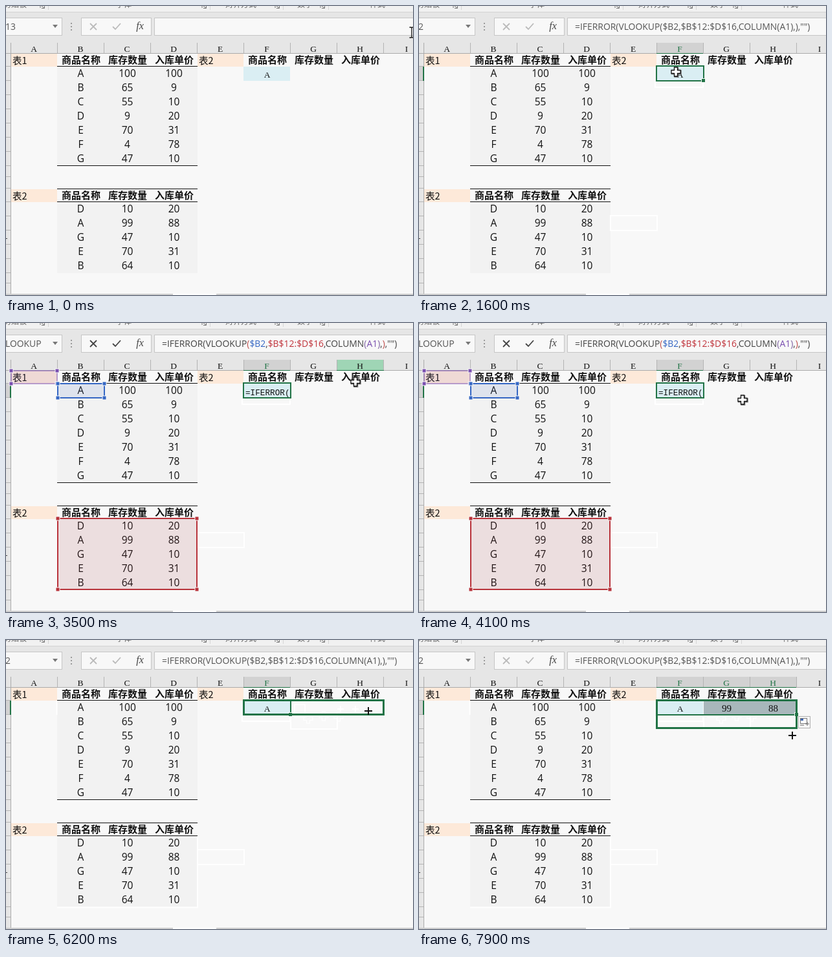
Recreate the animation shown at these times as an HTML page. Size 629 by 448 pixels, loop 8000 ms.

```html
<!DOCTYPE html>
<html lang="zh">
<head>
<meta charset="utf-8">
<title>Spreadsheet lookup</title>
<style>
html, body { margin: 0; width: 629px; height: 448px; overflow: hidden; background: #f8f8f8; }
svg { display: block; }
text { white-space: pre; fill: #111; }
.ui { font: 13.9px "Open Sans", "Noto Sans", sans-serif; fill: #555; }
.num { font: 15.5px "Open Sans", "Noto Sans", sans-serif; text-anchor: middle; }
.head { font: bold 15px "Noto Sans CJK SC", "Noto Sans CJK", sans-serif; text-anchor: middle; }
.cjk { font: 14.5px "Noto Sans CJK SC", "Noto Sans CJK", sans-serif; }
.small { font: 12px "Noto Sans CJK SC", "Noto Sans CJK", sans-serif; fill: #666; }
.col { font: 13.5px "Liberation Serif", serif; text-anchor: middle; }
.val { font: 15px "Liberation Serif", serif; text-anchor: middle; }
.fx { font: italic 16px "Liberation Serif", serif; text-anchor: middle; fill: #444; }
.mono { font: 12.7px "Liberation Mono", monospace; }
</style>
</head>
<body>
<svg id="stage" width="629" height="448" viewBox="0 0 629 448"></svg>
<script>
const LOOP = 8000, GREEN = '#217346', LINE = '#b4b4b4';
const stage = document.getElementById('stage');
const colX = i => 7 + 72 * i;
const rowY = [0, 73, 94, 116, 138, 160, 182, 204, 226, 248, 265, 283, 304, 326, 348, 370, 392, 414, 430, 447];

function add(parent, tag, attrs, content) {
  const el = document.createElementNS('http://www.w3.org/2000/svg', tag);
  for (const k in attrs) el.setAttribute(k, attrs[k]);
  if (content !== undefined) el.textContent = content;
  parent.appendChild(el);
  return el;
}
const group = (parent = stage) => add(parent, 'g', {});
const box = (p, x, y, width, height, fill) => add(p, 'rect', { x, y, width, height, fill });
const path = (p, d, stroke, width = 1, fill = 'none') =>
  add(p, 'path', { d, stroke, 'stroke-width': width, fill });
const text = (p, cls, x, y, s) => add(p, 'text', { class: cls, x, y }, s);
const frame = (p, x, y, width, height, stroke, w = 2, fill = 'none') =>
  add(p, 'rect', { x, y, width, height, stroke, 'stroke-width': w, fill });
const show = (el, on) => el.setAttribute('visibility', on ? 'visible' : 'hidden');

// Ribbon and formula bar
function drawBars() {
  box(stage, 0, 0, 629, 9, '#f1f1f1');
  box(stage, 0, 9, 629, 64, '#e6e6e6');
  path(stage, 'M0 9.5H629', '#d2d2d2');
  [[-4, '剪贴板'], [170, '字体'], [339, '对齐方式'], [450, '数字'], [562, '样式']]
    .forEach(([x, s]) => text(stage, 'small', x, 2, s));
  [57, 307, 420, 490].forEach(x => {
    path(stage, `M${x - 4} 0V3M${x - 2} 0L${x + 2} 3M${x + 2.5} 0V3.5H${x - 2}`, '#777');
    path(stage, `M${x + 8.5} 0V6`, '#d5d5d5');
  });
  [[-2, 88], [116, 108], [229, 410]].forEach(([x, w]) =>
    frame(stage, x + .5, 18.5, w, 27, '#c6c6c6', 1, '#f8f8f8'));
  path(stage, 'M72 29H80L76 34Z', 'none', 0, '#777');
  [27, 32, 37].forEach(y => box(stage, 100, y - 1, 2, 2, '#999'));
  text(stage, 'fx', 207, 36, 'fx');
}

// Column and row headings, tables
function drawSheet() {
  box(stage, 0, 74, 7, 374, '#e6e6e6');
  'ABCDEFGHI'.split('').forEach((c, i) => {
    path(stage, `M${colX(i) + .5} 57V73`, LINE);
    text(stage, 'col', colX(i) + 36, 70.5, c);
  });
  rowY.slice(2).forEach(y => path(stage, `M0 ${y - .5}H7`, LINE));
  path(stage, 'M0 73.5H629M7.5 57V448', '#ababab');
  path(stage, 'M0 360.5H2', '#444');

  [[0, 74, '表1'], [4, 74, '表2'], [0, 284, '表2']].forEach(([c, y, s]) => {
    box(stage, colX(c) + 1, y, 71, 20, '#fde9d9');
    text(stage, 'cjk', colX(c) + 3, y + 16, s);
  });
  table(1, 'A 100 100,B 65 9,C 55 10,D 9 20,E 70 31,F 4 78,G 47 10');
  table(11, 'D 10 20,A 99 88,G 47 10,E 70 31,B 64 10');
  path(stage, 'M79 93.5H296M79 247.5H296M79 283.5H296M79 303.5H296', '#111');
  heads(5, 73);
  box(stage, 367, 94, 72, 22, '#daeef3');
  path(stage, 'M0 447H258M325 447H629', '#cfcfcf', 2);
  box(stage, 258, 446, 67, 2, '#fff');
}
function heads(col, y) {
  ['商品名称', '库存数量', '入库单价'].forEach((s, i) =>
    text(stage, 'head', colX(col + i) + 37, y + 16, s));
}
function table(row, data) {
  const rows = data.split(','), top = rowY[row + 1];
  box(stage, 79, top, 217, rows.length * 22, '#f2f2f2');
  heads(1, rowY[row]);
  rows.forEach((r, j) => r.split(' ').forEach((v, i) =>
    text(stage, 'num', colX(i + 1) + 36.5, top + 16 + 22 * j, v)));
}

// A highlighted heading pair for the current selection
function heading(c0, c1, row) {
  const g = group();
  for (let c = c0; c <= c1; c++) {
    box(g, colX(c) + 1, 57, 71, 16, '#d2d2d2');
    text(g, 'col', colX(c) + 36, 70.5, 'ABCDEFGHI'[c]).style.fill = GREEN;
  }
  path(g, `M${colX(c0)} 73.5H${colX(c1 + 1)}`, GREEN);
  box(g, 0, rowY[row], 7, rowY[row + 1] - rowY[row] - 1, '#d2d2d2');
  path(g, `M7 ${rowY[row]}V${rowY[row + 1]}`, GREEN, 2);
  return g;
}
function rangeMark(g, x, y, w, h, color, line = 2) {
  frame(g, x, y, w, h, color, line, color).setAttribute('fill-opacity', .1);
  [[x, y], [x + w, y], [x, y + h], [x + w, y + h]].forEach(([a, b]) =>
    frame(g, a - 3, b - 3, 6, 6, '#f8f8f8', 1, color));
}
const plusShape = 'M-2.5-7H2.5V-2.5H7V2.5H2.5V7H-2.5V2.5H-7V-2.5H-2.5Z';

drawBars();
drawSheet();

const nameText = text(stage, 'ui', -1, 36.5, '');
const buttons = path(stage, 'M130 27L140 37M140 27L130 37M165 32L169 36L177 27', '#bbb', 1.8);

// Formula, plain or with coloured references
const formula = text(stage, 'ui', 241, 36.5);
const parts = [['=IFERROR('], ['VLOOKUP'], ['(', '#c0504d'], ['$B2', '#3567c4'], [','], ['$B$12:$D$16', '#c0343c'],
  [','], ['COLUMN'], ['(', '#8064a2'], ['A1', '#7a4fb0'], [')', '#8064a2'], [','], [')', '#c0504d'], [',"")']]
  .map(([s, c]) => ({ el: add(formula, 'tspan', {}, s), c: c || '#444' }));

const headE = heading(4, 4, 13), headF = heading(5, 5, 2), headG = heading(6, 6, 3), headFH = heading(5, 7, 2);
const hover = group();
box(hover, 511, 57, 73, 16, '#9fd5b5');
path(hover, 'M511.5 57V73M583.5 57V73', LINE);
path(hover, 'M511 73.5H584', GREEN);
text(hover, 'col', 547, 70.5, 'H');

// Faint white traces left after the selection has moved
const traceA = group(), traceB = group();
frame(traceA, 296, 325, 72, 23, '#fff', 2);
path(traceA, 'M365 118V126H439V118', '#fff', 2);
frame(traceB, 440, 117, 72, 21, '#fff', 2);
frame(traceB, 446, 100, 16, 20, '#fff', 1.5);
path(traceB, 'M79 414.5H296V304M78.5 94V116', '#fff', 2);
[[514, 119], [491, 118], [467, 122]].forEach(([x, y]) =>
  path(traceB, plusShape, '#fff', 1.2).setAttribute('transform', `translate(${x} ${y})`));
const traceC = group();
[517, 540].forEach(x => path(traceC, `M${x - 5} 107H${x + 5}M${x} 102V112`, '#fff', 2));

const filled = group();
box(filled, 440, 94, 143, 22, '#a8b7bb');
text(filled, 'val', 475.5, 111, '99');
text(filled, 'val', 547.5, 111, '88');
const cellA = text(stage, 'col', 403.5, 111, 'A');

const edit = group();
rangeMark(edit, 8, 74, 71, 20, '#7a4fb0', 1);
rangeMark(edit, 80, 94, 72, 22, '#3567c4');
rangeMark(edit, 80, 303, 215, 110, '#b8323a');
text(edit, 'mono', 370, 111.5, '=IFERROR(');

const selection = frame(stage, 0, 0, 0, 0, GREEN, 2);
const handle = frame(stage, 0, 0, 6, 6, '#f8f8f8', 1, GREEN);
const drag = frame(stage, 0, 0, 0, 0, GREEN, 3);

const options = group();
frame(options, 586.5, 118.5, 18, 18, '#b0b0b0', 1, '#f8f8f8');
frame(options, 589.5, 121.5, 10, 8, '#777', 1, '#fff');
box(options, 590, 122, 4, 3, '#3f68b5');
path(options, 'M589 132H595M597 130H603M600 127V133', '#666');

const tip = group();
frame(tip, 609.5, 47.5, 40, 18, '#bbb', 1, '#fff');
text(tip, 'small', 611, 61, '编辑栏');

const cursors = { beam: group(), cross: group(), plus: group(), down: group() };
path(cursors.beam, 'M-3.5-8H-1L0-7L1-8H3.5M0-7V7M-3.5 8H-1L0 7L1 8H3.5', '#111', 1.3);
path(cursors.cross, plusShape, '#777', 2).setAttribute('transform', 'translate(.8 .8)');
path(cursors.cross, plusShape, '#111', 1.3, '#fff');
path(cursors.plus, 'M-6 0H6M0-6V6', '#111', 2);
path(cursors.down, 'M-1-6H1V1H4L0 6L-4 1H-1Z', '#111', 1, '#111');

// Pointer stops: start time, kind, then one x,y for every 100 ms
const pointer = [
  [0, 'beam', '627,41'], [100, 'cross', '560,68 482,98 413,109'],
  [1000, 'cross', '408,99'], [1200, 'cross', '407,99'],
  [1400, 'cross', '406,100 402,101 397,102 398,101 408,95 446,80'],
  [2000, 'beam', '530,40 595,34 621,27 622,28 621,32'],
  [3100, 'beam', '617,35 601,44'], [3300, 'down', '575,64'],
  [3400, 'cross', '556,78 540,91 525,108 512,120'],
  [4000, 'cross', '508,120 500,119 491,118 489,118 484,118 479,118 476,118'],
  [4900, 'cross', '423,106 427,108 431,111 435,114'],
  [5300, 'plus', '439,116 440,116'], [5700, 'plus', '444,115 465,111 491,108 517,107 540,107 560,110'],
  [6400, 'cross', '562,110 565,110 568,111 571,112 575,113 579,114'],
  [7000, 'plus', '582,116 584,117'], [7800, 'plus', '582,135 577,148']
];
function pointerAt(t) {
  const [start, kind, list] = pointer.filter(p => p[0] <= t).pop();
  const spots = list.split(' ');
  const [x, y] = spots[Math.min(Math.floor((t - start) / 100), spots.length - 1)].split(',').map(Number);
  return { kind, x, y };
}

function place(el, x, y, w, h) {
  Object.entries({ x, y, width: w, height: h }).forEach(([k, v]) => el.setAttribute(k, v));
}
function select(x, y, w, h, knob) {
  place(selection, x, y, w, h);
  handle.setAttribute('x', x + w - 3.5);
  handle.setAttribute('y', y + h - 3.5);
  show(handle, knob);
}

function draw(now) {
  const t = Math.floor(now % LOOP / 100) * 100;
  const within = (a, b) => t >= a && t < b;
  const editing = within(2700, 4200), onG = within(4200, 4900), done = t >= 6400;
  const p = pointerAt(t);

  nameText.textContent = t < 1400 ? '13' : editing ? 'LOOKUP' : onG ? '3' : '2';
  buttons.setAttribute('stroke', editing ? '#444' : '#bbb');
  show(formula, t >= 1400 && !onG);
  parts.forEach(({ el, c }) => el.style.fill = editing ? c : '#555');

  show(headE, within(1000, 1400));
  show(headF, t >= 1400 && !onG && !done);
  show(headG, onG);
  show(headFH, done);
  show(hover, within(3300, 3700));
  show(traceA, t >= 1400);
  show(traceB, t >= 4900);
  show(traceC, within(6100, 6400));
  show(cellA, !editing);
  show(edit, editing);
  show(filled, done);
  show(options, t >= 6500);
  show(tip, t === 2600);

  show(selection, t >= 1000);
  if (t < 1000) show(handle, false);
  else if (t < 1400) select(296, 325, 72, 23, true);
  else if (onG) select(440, 116, 72, 22, true);
  else if (t === 4900) select(372, 95, 73, 23, true);
  else if (done) select(367, 93, 217, 23, true);
  else select(367, 93, 73, 23, !editing);

  show(drag, within(5700, 6400) || t >= 7800);
  if (t >= 7800) place(drag, 367.5, 93.5, 216, 43);
  else place(drag, 367.5, 93.5, p.x > 512 ? 216 : p.x > 450 ? 144 : 72, 22);

  for (const k in cursors) show(cursors[k], k === p.kind);
  cursors[p.kind].setAttribute('transform', `translate(${p.x} ${p.y})`);
}

const begin = performance.now();
function tick() {
  draw(performance.now() - begin);
  requestAnimationFrame(tick);
}
tick();
</script>
</body>
</html>
```
